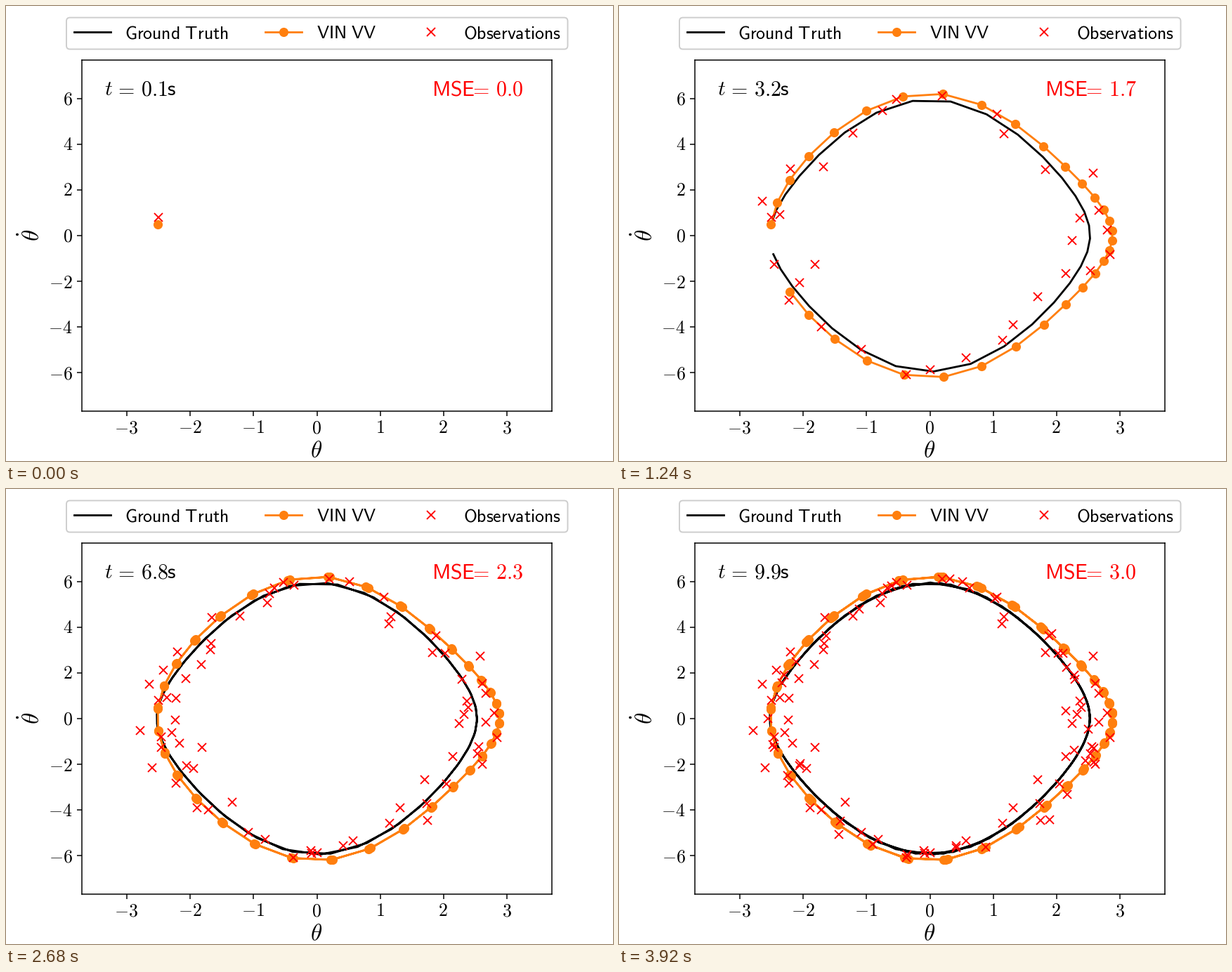
Recreate the animation shown at these times as a matplotlib script. Size 864 px wide and 648 px high, loop 3960 ms.

```python
import numpy as np
import matplotlib.pyplot as plt
from matplotlib.animation import FuncAnimation
from matplotlib.patches import FancyBboxPatch

plt.rcParams["mathtext.fontset"] = "cm"

W, H, DPI = 864, 648, 135
LEFT, RIGHT, TOP, BOTTOM = 108, 777.1, 77.1, 576.72
STEPS, DT = 99, 0.1006
X_LIM, Y_LIM = 3.708, 7.7
START = (-2.506, 0.495)
ORANGE = "#ff7f0e"


def pendulum(theta):
    return -9.81 * np.sin(theta)


def learned(theta):
    """Pendulum force that pushes back harder near both turning points."""
    return (-9.7 * np.sin(theta) + 0.0945 * min(theta, 0) ** 4
            - 3.4 * max(theta - 2.38, 0))


def orbit(force, sub=50):
    """Phase path sampled once per step, by leapfrog with small substeps."""
    (theta, omega), h, path = START, DT / sub, []
    for _ in range(STEPS):
        path.append((theta, omega))
        for _ in range(sub):
            omega += h / 2 * force(theta)
            theta += h * omega
            omega += h / 2 * force(theta)
    return np.array(path)


truth = orbit(pendulum)
guess = orbit(learned)

# Speed readings are noisier where the swing is wide
rng = np.random.RandomState(4)
spread = np.column_stack([np.full(STEPS, 0.22),
                          0.1 + 0.2 * np.abs(truth[:, 0])])
seen = truth + spread * rng.randn(STEPS, 2)

squared = ((guess - truth) ** 2).sum(axis=1)
error = squared.cumsum() / np.arange(1, STEPS + 1)

fig = plt.figure(figsize=(W / DPI, H / DPI), dpi=DPI, facecolor="white")
ax = fig.add_axes([LEFT / W, 1 - BOTTOM / H,
                   (RIGHT - LEFT) / W, (BOTTOM - TOP) / H])
ax.set(xlim=(-X_LIM, X_LIM), ylim=(-Y_LIM, Y_LIM),
       xticks=range(-3, 4), yticks=range(-6, 7, 2))
ax.tick_params(labelbottom=False, labelleft=False)

# Transparent layer in stage pixels, y pointing down
stage = fig.add_axes([0, 0, 1, 1])
stage.set(xlim=(0, W), ylim=(H, 0))
stage.axis("off")


def put(x, y, text, size, ha="left", **kw):
    return stage.text(x, y, f"${text}$", fontsize=size, ha=ha,
                      va="baseline", **kw)


def sans(text):
    return r"\mathsf{" + text.replace(" ", r"\ ") + "}"


def tick_x(v):
    return np.interp(v, (-X_LIM, X_LIM), (LEFT, RIGHT))


def tick_y(v):
    return np.interp(v, (-Y_LIM, Y_LIM), (BOTTOM, TOP))


# Tick and axis labels
for v in range(-3, 4):
    put(tick_x(v) - 0.7, 608.2, v, 13.8, "center")
for v in range(-6, 7, 2):
    put(94.7, tick_y(v) + (9.8 if v < 0 else 8.2), v, 13.8, "right")
put(442, 643, r"\theta", 17.6, "center")
put(47.8, 326.7, r"\dot{\theta}", 17.6, "center", rotation=90,
    rotation_mode="anchor")

STYLES = [
    dict(color="black"),
    dict(color=ORANGE, marker="o"),
    dict(color="red", marker="x", ls="none"),
]
NAMES = ["Ground Truth", "VIN VV", "Observations"]

# Legend: each handle is 52.5 wide with its label 20 further on
stage.add_patch(FancyBboxPatch(
    (86, 16.5), 713.5, 45, boxstyle="round,pad=0,rounding_size=5",
    fc="white", ec="0.8", lw=1))
for x, name, style in zip((96.5, 368.8, 578.3), NAMES, STYLES):
    stage.plot((x, x + 26.25, x + 52.5), (36.8,) * 3, lw=1.5, ms=6,
               markevery=[1], **style)
    put(x + 72.7, 46.3, sans(name), 13.7)

# Read-outs
put(140.5, 127.3, "t", 16)
put(168.3, 127.3, "=", 16, "center")
clock = put(191.6, 127.3, "0.1", 16)
put(229.3, 127.3, sans("s"), 16)
put(605.8, 127.3, sans("MSE"), 16, color="red")
put(673.9, 127.3, "=", 16, "center", color="red")
score = put(696.9, 127.3, "0.0", 16, color="red")

lines = [ax.plot([], [], lw=1.5, ms=6, **style)[0] for style in STYLES]


def draw(k):
    for line, path in zip(lines, (truth, guess, seen)):
        line.set_data(path[:k + 1, 0], path[:k + 1, 1])
    clock.set_text(f"${(k + 1) / 10:.1f}$")
    score.set_text(f"${error[k]:.1f}$")
    return [*lines, clock, score]


anim = FuncAnimation(fig, draw, frames=STEPS, interval=40, repeat=True,
                     repeat_delay=0, blit=False)
plt.show()
```
